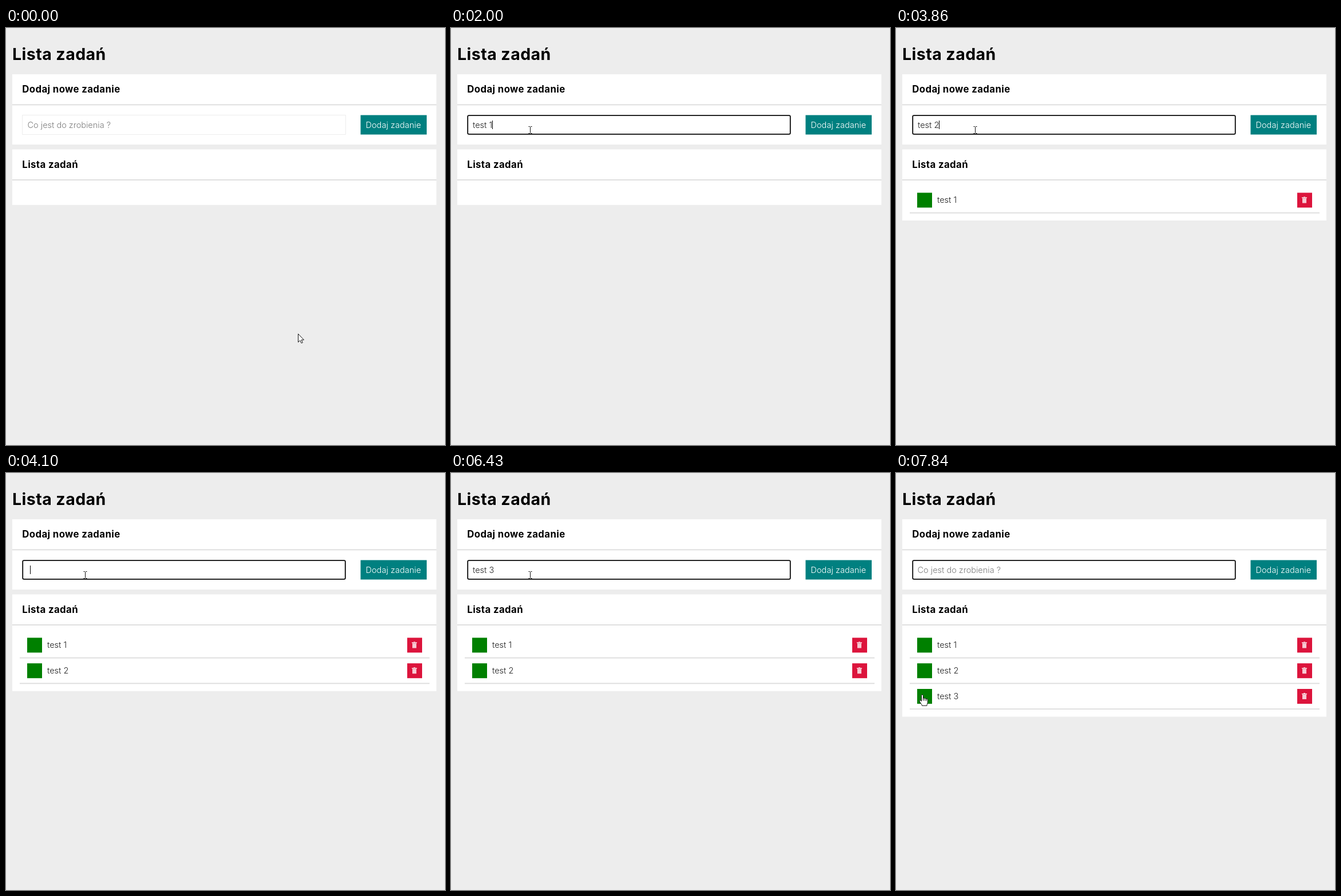
These frames come from a looping animation (767 by 730 pixels, 7.99 s). An HTML page with a canvas:

```html
<!DOCTYPE html>
<html lang="pl">
<head>
<meta charset="utf-8">
<title>Lista zadań</title>
<style>
html, body { margin: 0; width: 100%; height: 100%; overflow: hidden; background: #ededed; }
canvas { display: block; }
</style>
</head>
<body>
<canvas id="stage" width="767" height="730"></canvas>
<script>
const ctx = document.getElementById('stage').getContext('2d', { alpha: false });
const LOOP = 7990;
const FONT = 'Inter, "Open Sans", sans-serif';
const LIGHT = 14.5;

// [time, typed text, list length, caret visible]
const states = [
  [0, '', 0, 0], [660, '', 0, 1], [1140, '', 0, 0],
  [1300, 't', 0, 1], [1440, 'te', 0, 1], [1610, 'tes', 0, 1],
  [1690, 'test', 0, 1], [1760, 'test ', 0, 1], [2000, 'test 1', 0, 1],
  [2150, '', 1, 1], [2530, '', 1, 0],
  [2930, 't', 1, 1], [2990, 'te', 1, 1], [3160, 'tes', 1, 1],
  [3220, 'test', 1, 1], [3630, 'test ', 1, 1], [3860, 'test 2', 1, 1],
  [4010, '', 2, 1], [4100, ' ', 2, 1], [4710, ' ', 2, 0], [4970, '', 2, 0],
  [5200, 't', 2, 1], [5360, 'te', 2, 1], [5430, 'tes', 2, 1],
  [5510, 'test', 2, 1], [5650, 'test ', 2, 1], [5910, 'test 3', 2, 1],
  [6430, 'test 3', 2, 0], [6600, '', 3, 0], [6980, '', 3, 1], [7440, '', 3, 0]
];

// Pointer moves: start time, time per step, positions
const moves = [
  { at: 70, step: 74, path: [[496, 512], [436, 426], [348, 308], [262, 214], [196, 152], [158, 128], [143, 156], [138, 178]] },
  { at: 7140, step: 75.7, path: [[135, 186], [112, 232], [78, 293], [46, 346], [26, 378], [22, 388], [36, 388], [45, 387]] },
  { at: 7840, step: 1, path: [[46, 388]] }
];

function rect(x, y, w, h, color) {
  ctx.fillStyle = color;
  ctx.fillRect(x, y, w, h);
}

function text(str, x, y, size, weight, color, spacing = 0) {
  ctx.font = `${weight} ${size}px ${FONT}`;
  ctx.letterSpacing = spacing + 'px';
  ctx.fillStyle = color;
  ctx.fillText(str, x, y);
  return ctx.measureText(str).width;
}

function panel(y, h, title) {
  rect(11, y, 741, h, '#fff');
  rect(11, y + 52.5, 741, 1.8, '#dcdcdc');
  text(title, 28.3, y + 32, 16.8, 650, '#000', 0.38);
}

function input(typed, focused, caret) {
  ctx.beginPath();
  if (focused) {
    ctx.roundRect(29.2, 153.2, 563.6, 32.6, 2);
    ctx.lineWidth = 1.8;
    ctx.strokeStyle = '#080808';
  } else {
    ctx.rect(28.5, 152.5, 565, 34);
    ctx.lineWidth = 1;
    ctx.strokeStyle = '#ededed';
  }
  ctx.stroke();
  let width = 0;
  if (typed) width = text(typed, 38, 174.5, LIGHT, 300, '#222');
  else text('Co jest do zrobienia ?', 37.5, 174.5, LIGHT, 300, '#7c7c7c');
  if (caret) rect(38 + Math.floor(width), 162, 1, 15, typed ? '#000' : '#118011');
}

function row(i) {
  const y = 288.4 + i * 44.8;
  rect(37, y, 26, 26, '#008000');
  text('test ' + (i + 1), 72, y + 17.6, LIGHT, 300, '#222');
  rect(701, y, 26, 26, '#dc143c');
  rect(709, y + 8, 9, 1.6, '#fbdde2');
  rect(712, y + 7, 3, 1, '#fbdde2');
  rect(710.5, y + 10, 6, 8, '#eb8a9d');
  for (const x of [710.3, 712.8, 715.3]) rect(x, y + 10, 1.4, 8, '#fff');
  rect(24, y + 34.3, 716, 1.8, '#dcdcdc');
}

function pointerAt(t) {
  let pos = [510, 535];
  for (const { at, step, path } of moves) {
    if (t >= at) pos = path[Math.min(path.length - 1, Math.floor((t - at) / step))];
  }
  return pos;
}

const arrow = new Path2D('M0 0V14.5L3.3 11.4L5.6 16.2L7.8 15.2L5.6 10.5H10Z');
const hand = new Path2D('M-1.5 1.5C-1.5 -.4 1.5 -.4 1.5 1.5V7C1.5 5.6 4 5.6 4 7.3C4.3 6.2 6.7 6.4 6.7 8C7.2 7.1 9.3 7.4 9.3 9V13.5C9.3 15.5 8 16.5 8 19.3H-.5C-.5 17 -4.8 13.4 -5 11C-5 9.6 -3 9.2 -1.5 11.5Z');
const knuckles = new Path2D('M1.5 7V10.5M4 7.5V10.5M6.7 8V11');
const beam = new Path2D('M-2.5 -5.5H-.5L.5 -4.5L1.5 -5.5H3.5M.5 -4.5V5.5M-2.5 6.5H-.5L.5 5.5L1.5 6.5H3.5');

function pointer([x, y]) {
  const inside = (l, t, w, h) => x >= l && x < l + w && y >= t && y < t + h;
  ctx.save();
  ctx.translate(x, y);
  ctx.lineWidth = 1;
  ctx.strokeStyle = '#111';
  ctx.fillStyle = '#fff';
  if (inside(28, 152, 566, 35)) {
    ctx.stroke(beam);
  } else if ([288, 333, 378].some(top => inside(37, top, 26, 26))) {
    ctx.fill(hand);
    ctx.stroke(hand);
    ctx.stroke(knuckles);
  } else {
    ctx.translate(0.5, 0.5);
    ctx.fill(arrow);
    ctx.stroke(arrow);
  }
  ctx.restore();
}

function draw(t) {
  const [, typed, count, caret] = states.findLast(s => s[0] <= t);
  rect(0, 0, 767, 730, '#ededed');
  text('Lista zadań', 11, 56, 28.5, 680, '#000', 0.45);
  panel(81, 123, 'Dodaj nowe zadanie');
  input(typed, t >= 660, caret);
  rect(619.5, 152.5, 115.5, 34, '#008080');
  text('Dodaj zadanie', 628.5, 174.5, LIGHT, 300, '#fff', 0.05);
  panel(212.5, count ? 79.7 + count * 44.8 : 97.3, 'Lista zadań');
  for (let i = 0; i < count; i++) row(i);
  pointer(pointerAt(t));
}

const start = performance.now();
function tick() {
  draw((performance.now() - start) % LOOP);
  requestAnimationFrame(tick);
}
tick();
</script>
</body>
</html>
```
